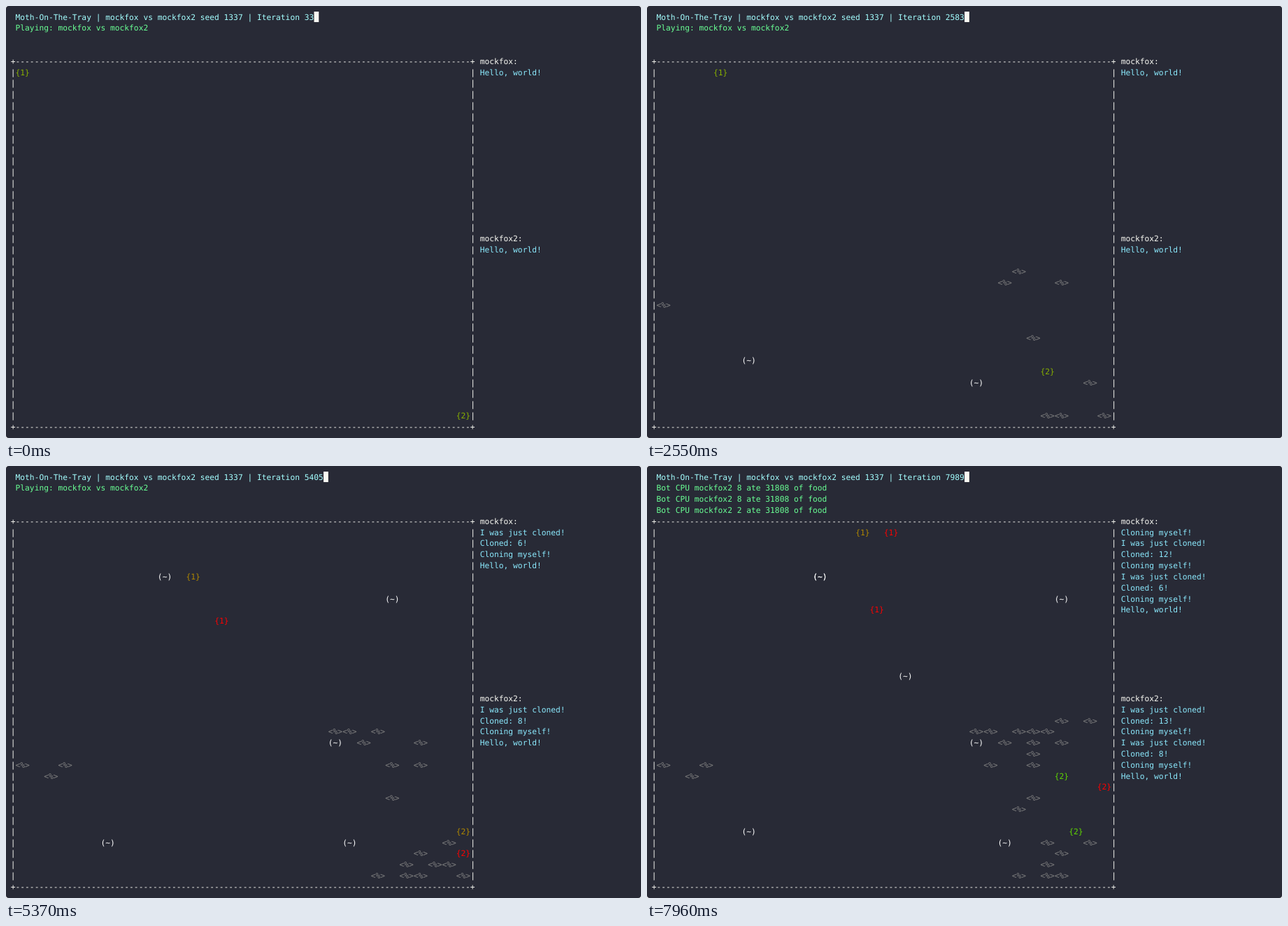
These frames come from a looping animation (908x617 px, 7990 ms). An HTML page:

```html
<!DOCTYPE html>
<html lang="en">
<head>
<meta charset="utf-8">
<title>Grid bots</title>
<style>
  html, body { margin: 0; width: 100%; height: 100%; overflow: hidden; background: #fff; }
  svg { display: block; width: 908px; height: 617px; background: #282a36; border-radius: 4px; }
  text { font: 11.255px "DejaVu Sans Mono", monospace; text-rendering: geometricPrecision; white-space: pre; }
</style>
</head>
<body>
<svg viewBox="0 0 908 617"><g id="frame"></g><g id="live"></g></svg>
<script>
const LOOP = 7990, STEP = 34;
const COL = 6.777, ROW = 15.82, TOP = 8;
const SIZE = 32; // the board is 32 x 32 cells, three characters each

const FG = "#f8f8f2", TITLE = "#a4ffff", CYAN = "#8be9fd", LOG = "#69ff94";
const OLIVE = "#87af00", AMBER = "#af8700", RED = "#ff0000", GREEN = "#5fd700";
const TEAMS = ["mockfox", "mockfox2"];
const VERSUS = TEAMS.join(" vs ");

const rand = n => {
  const v = Math.sin(n * 12.9898) * 43758.5453;
  return v - Math.floor(v);
};

// Plants appear at a steady rate: first the founders, then sprouts close to them.
const founders = [[28, 31], [30, 28], [25, 18], [28, 19], [0, 21], [24, 19], [26, 24], [27, 31], [31, 31]];
const plants = [...founders];
const onBoard = v => v >= 0 && v < SIZE;
for (let n = 1; plants.length < 30; n++) {
  const parent = founders[Math.floor(rand(n) * founders.length)];
  const [x, y] = parent.map((v, axis) => v + Math.round(6 * rand(n + 100 * (axis + 1)) - 3));
  const taken = plants.some(([px, py]) => px === x && py === y);
  if (onBoard(x) && onBoard(y) && !taken) plants.push([x, y]);
}
const plantBorn = i => 180 + 270 * i;

// Animals turn up one per second and roam around their home cell.
const homes = [[23, 28], [6, 27], [22, 18], [27, 6], [10, 4], [11, 5], [17, 13]];
const animalBorn = i => 700 + 1000 * i;

// Each bot dashes to its next stop at the start of every beat, then slows down.
const FIRST_BEAT = 850, BEAT = 1700;
const bots = [
  { team: 1, id: 1, born: 0, stops: [[0, 0], [4, 0], [11, 2], [12, 4], [13, 0], [14, 0]] },
  { team: 2, id: 2, born: 0, stops: [[31, 31], [27, 27], [31, 25], [31, 27], [29, 22], [28, 22]] },
  { team: 1, id: 6, born: 3700, stops: [[9, 3], [10, 7], [14, 8], [16, 5], [15, 8]] },
  { team: 2, id: 8, born: 4700, stops: [[31, 27], [31, 29], [29, 28], [29, 27]] },
  { team: 1, id: 12, born: 7200, stops: [[14, 1], [16, 0]] },
  { team: 2, id: 13, born: 7600, stops: [[31, 23]] },
  { team: 1, id: 16, born: 8018, stops: [[14, 0]] }, // only announced before the loop ends
];
const isClone = bot => bot.id > 2;

const meals = [8, 2, 8, 8].map((id, i) => ({
  id, time: 5600 + 500 * i, amount: i ? 31808 : 31488, plant: 8 + 3 * i,
}));

const log = [
  [0, `Playing: ${VERSUS}`],
  ...meals.map(m => [m.time, `Bot CPU ${TEAMS[1]} ${m.id} ate ${m.amount} of food`]),
];
const chats = [1, 2].map(team => [
  [0, "Hello, world!"],
  ...bots.filter(bot => bot.team === team && isClone(bot)).flatMap(({ id, born }) => [
    [born - 68, "Cloning myself!"], [born, `Cloned: ${id}!`], [born, "I was just cloned!"],
  ]),
]);

const print = (col, row, color, text) =>
  `<text x="${(col * COL).toFixed(2)}" y="${(19.5 + row * ROW).toFixed(2)}" fill="${color}">` +
  `${text.replace(/</g, "&lt;")}</text>`;

const cell = ([x, y], color, text) => print(2 + 3 * x, 5 + y, color, text);

// Newest message on top
const messages = (list, time, col, row, color, limit = 12) =>
  list.filter(([at]) => at <= time).reverse().slice(0, limit)
    .map(([, text], i) => print(col, row + i, color, text)).join("");

function botCell({ born, stops }, time) {
  const beats = t => Math.max(0, (t - FIRST_BEAT) / BEAT);
  const progress = beats(time) - Math.floor(beats(born));
  const leg = Math.floor(progress);
  const from = stops[leg] ?? stops.at(-1), to = stops[leg + 1] ?? from;
  const eased = 1 - (1 - progress + leg) ** 5;
  return from.map((v, axis) => Math.round(v + (to[axis] - v) * eased));
}

function botColor(bot, time) {
  if (meals.some(m => m.id === bot.id && m.time <= time)) return GREEN;
  if (isClone(bot)) return RED;
  return time < 3250 ? OLIVE : AMBER;
}

function animalCell(i, time) {
  const beat = Math.floor((time - animalBorn(i)) / 1300);
  return homes[i].map((v, axis) => v + Math.round(1.4 * rand(50 * i + 2 * beat + axis) - 0.7));
}

function drawFrame() {
  const edge = "+" + "-".repeat(3 * SIZE) + "+";
  let out = print(1, 4, FG, edge) + print(1, 5 + SIZE, FG, edge);
  for (let y = 0; y < SIZE; y++) {
    out += print(1, 5 + y, FG, "|") + print(2 + 3 * SIZE, 5 + y, FG, "|");
  }
  TEAMS.forEach((name, i) => out += print(100, 4 + 16 * i, FG, name + ":"));
  return out;
}

function drawLive(time) {
  const title = `Moth-On-The-Tray | ${VERSUS} seed 1337 | Iteration ${33 + time}`;
  let out = print(2, 0, TITLE, title);
  out += `<rect x="${(2 + title.length) * COL}" y="${TOP}" width="${COL}" height="15" fill="${FG}"/>`;
  out += messages(log, time, 2, 1, LOG, 3);
  chats.forEach((chat, i) => out += messages(chat, time, 100, 5 + 16 * i, CYAN));

  const eaten = meals.filter(m => m.time <= time).map(m => m.plant);
  plants.forEach((spot, i) => {
    if (plantBorn(i) <= time && !eaten.includes(i)) out += cell(spot, "#808080", "<%>");
  });
  homes.forEach((_, i) => {
    if (animalBorn(i) <= time) out += cell(animalCell(i, time), "#ffffff", "(~)");
  });
  for (const bot of bots) {
    if (bot.born <= time) out += cell(botCell(bot, time), botColor(bot, time), `{${bot.team}}`);
  }
  return out;
}

const live = document.getElementById("live");
document.getElementById("frame").innerHTML = drawFrame();

const start = performance.now();
let shown = -1;
function tick() {
  const elapsed = Math.max(0, performance.now() - start) % LOOP;
  // screen updates fall on 10 ms marks, 34 ms apart on average
  const step = Math.floor((Math.floor(elapsed / 10) * 10 + 5) / STEP);
  const time = Math.min(step, 234) * STEP;
  if (time !== shown) live.innerHTML = drawLive(shown = time);
  requestAnimationFrame(tick);
}
tick();
</script>
</body>
</html>
```
